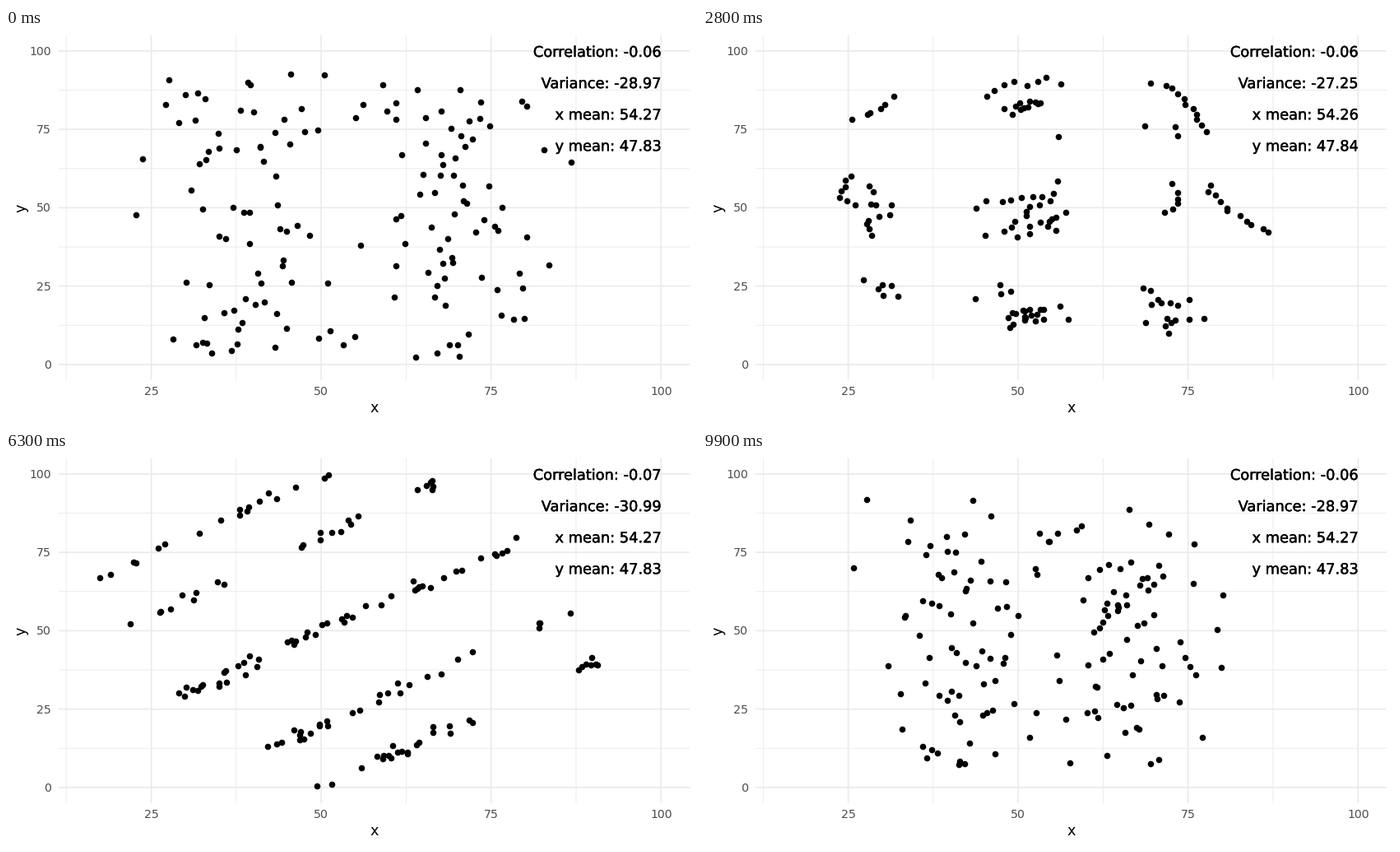
A matplotlib script for the animation above (10 s loop, 840x480 px).

```python
import numpy as np
import matplotlib.pyplot as plt
from matplotlib import patheffects
from matplotlib.animation import FuncAnimation

W, H, DPI = 840, 480, 100
PT = 72 / DPI
FRAMES, INTERVAL = 100, 100
MEAN, SD = np.array([54.27, 47.83]), np.array([16.77, 26.94])
rng = np.random.default_rng(8)


def to_pixels(points):
    return np.array([176.6, 408.9]) + (points - [25, 0]) * [8.262, -3.81]


def curve(*knots, spacing=3.45):
    """Evenly spaced points on a Catmull-Rom curve through the knots."""
    k = np.array(knots, float)
    k = np.vstack([2 * k[0] - k[1], k, 2 * k[-1] - k[-2]])
    t = np.linspace(0, 1, 30)[:, None]
    path = np.vstack([
        b + t * (c - a) / 2 + t**2 * (2 * a - 5 * b + 4 * c - d) / 2
        + t**3 * (3 * b - a - 3 * c + d) / 2
        for a, b, c, d in zip(k, k[1:], k[2:], k[3:])])
    run = np.append(0, np.cumsum(np.hypot(*np.diff(path, axis=0).T)))
    at = np.linspace(0, run[-1], max(2, round(run[-1] / spacing) + 1))
    return np.column_stack([np.interp(at, run, path[:, 0]), np.interp(at, run, path[:, 1])])


dino = np.vstack([
    curve((55.4, 97.2), (42.8, 91.4), (26.2, 71.4), (22.3, 57.2),
          (29.5, 51), (50, 55.3), (59.2, 57.9), (61.8, 69.1)),              # snout and jaw
    curve((58, 99.5), (70.8, 91), (77.7, 71.4), (86.4, 47.6), (98.2, 33.7)),  # back and tail
    curve((57.4, 55.3), (42.8, 32.6), (30, 36.8), (38.2, 49.1)),            # neck and arm
    curve((29.7, 36), (35.9, 25.3), (49.5, 31.4), (56.7, 42.2),
          (67.9, 47.9), (71.5, 62.5), (69.5, 69.5)),                        # claw and shoulder
    curve((46.9, 79.9), (53, 85.7), (56.2, 82.9), (47.9, 77.6), spacing=2.3),  # eye
    curve((29.7, 59.9), (31.3, 62.6)),                                      # nostril
    curve((56.7, 40.6), (64.4, 24.1)),                                      # thigh
    curve((74.4, 22.9), (56, 18.3), (44.9, 13.7), spacing=2.8),             # belly
    curve((48.7, 14.9), (56, 14.1), spacing=2.5),                           # feet
    curve((52, 12.6), (46.2, 6), spacing=2.8),
    curve((50.5, 9.5), (78.2, 10.6)),
    curve((68, 8.7), (68.2, 2.9)),
])
N = len(dino)


def fit(pts):
    """Give the cloud the shared mean and standard deviation."""
    return MEAN + (pts - pts.mean(0)) * SD / pts.std(0)


def two_clouds():
    side = np.where(np.arange(N) % 2, 1, -1)
    x = MEAN[0] + 15 * side + rng.normal(0, 6.5, N)
    return np.clip(fit(np.column_stack([x, rng.uniform(0, 95, N)])), 0, 98)


def outline(vertices):
    v = np.array(vertices, float)
    return np.stack([v, np.roll(v, -1, axis=0)], axis=1)


def circle(radius):
    a = np.linspace(0, 2 * np.pi, 90, endpoint=False)
    return outline(MEAN + radius * np.column_stack([np.cos(a), np.sin(a)]))


def rows(*ys):
    return np.array([[(0, y), (100, y)] for y in ys], float)


def columns(*xs):
    return rows(*xs)[..., ::-1]


def snap(pts, segs):
    """Move every point to the nearest place on any segment."""
    a, d = segs[:, 0], segs[:, 1] - segs[:, 0]
    t = ((pts[:, None] - a) * d).sum(2) / ((d * d).sum(1) + 1e-9)
    q = a + np.clip(t, 0, 1)[..., None] * d
    nearest = ((q - pts[:, None]) ** 2).sum(2).argmin(1)
    return q[np.arange(len(pts)), nearest]


def reshape_dino(segs, spread):
    pts = dino + rng.normal(0, 2.5, dino.shape)
    for _ in range(2):
        pts = fit(snap(pts, segs))
    return np.clip(snap(pts, segs) + rng.normal(0, spread, dino.shape), 0, 99.7)


bullseye = np.vstack([circle(18), circle(37)])
dots = np.array([[(x, y)] * 2 for x in np.linspace(25.8, 75.6, 3)
                 for y in np.linspace(18, 83, 3)])
slant_up = np.array([[(max(0, -c), max(0, c)), (100 - max(0, c), 100 - max(0, -c))]
                     for c in (-50, -30, 0, 30, 50)], float)
slant_down = slant_up * [1, -1] + [0, 100]
half_star = np.array([(60, 90), (68, 60), (92, 60), (72, 40), (80, 10), (60, 30)])
star = outline(np.vstack([half_star, half_star[-2:0:-1] * [-1, 1] + [120, 0]]))
cross = np.array([[(27, 0), (83, 100)], [(27, 100), (83, 0)]], float)

# Points, variance, x mean, y mean.
STATES = [
    (two_clouds(), -28.97, 54.27, 47.83),
    (reshape_dino(bullseye, 1), -30.98, 54.27, 47.83),
    (reshape_dino(circle(31.4), 0.8), -30.85, 54.27, 47.84),
    (dino, -29.11, 54.26, 47.83),
    (reshape_dino(dots, 0.8), -27.25, 54.26, 47.84),
    (reshape_dino(rows(*np.linspace(10.3, 90.4, 5)), 0.2), -27.87, 54.26, 47.83),
    (reshape_dino(rows(21.5, 76), 3.5), -30.94, 54.27, 47.84),
    (reshape_dino(slant_down, 1.1), -31.15, 54.27, 47.84),
    (reshape_dino(slant_up, 0.9), -30.99, 54.27, 47.83),
    (reshape_dino(star, 0.9), -28.43, 54.27, 47.84),
    (reshape_dino(columns(*np.linspace(30.5, 89.5, 4)), 0.15), -31.37, 54.27, 47.84),
    (reshape_dino(columns(38, 69.5), 4), -30.08, 54.27, 47.83),
    (reshape_dino(cross, 3), -29.62, 54.26, 47.84),
]
# Moves take six frames, the last three take five; each is preceded by a rest.
STEPS = [6] * 10 + [5] * 3
ARRIVE = np.cumsum([s + 2 for s in STEPS]) - 1

fig = plt.figure(figsize=(W / DPI, H / DPI), dpi=DPI, facecolor="white")
plt.rcParams["font.family"] = "DejaVu Sans"
ax = fig.add_axes([0, 0, 1, 1])
ax.set(xlim=(0, W), ylim=(H, 0))
ax.axis("off")


def grid(values, width):
    style = dict(color="#EBEBEB", lw=width * PT, solid_capstyle="butt", snap=False, zorder=1)
    for v in values:
        x, y = to_pixels(np.array([v, v]))
        ax.plot([63.8, 831.2], [y, y], **style)
        if v > 0:
            ax.plot([x, x], [8.8, 427.9], **style)


major = range(0, 101, 25)
grid(np.arange(12.5, 100, 25), 0.9)
grid(major, 1.75)
for v in major:
    x, y = to_pixels(np.array([v, v]))
    tick = dict(color="#4D4D4D", fontsize=14.08 * PT, va="baseline")
    ax.text(55, y + 5, v, ha="right", **tick)
    if v > 0:
        ax.text(x, 446, v, ha="center", **tick)
title = dict(ha="center", fontsize=17.6 * PT)
ax.text(447.5, 467, "x", va="baseline", **title)
ax.text(18, 218.5, "y", va="center", rotation=90, **title)

scatter, = ax.plot([], [], "o", color="black", ms=7.6 * PT, mew=0, zorder=3)
bolder = patheffects.withStroke(linewidth=0.3, foreground="black")
stats = [ax.text(796.5, 35 + 38.1 * i, "", ha="right", va="baseline", fontsize=17.8 * PT,
                 path_effects=[bolder], zorder=4) for i in range(4)]


def update(frame):
    i = int(np.searchsorted(ARRIVE, frame, side="right"))
    t = max(0, 1 - (ARRIVE[i] - frame) / STEPS[i])
    start, end = STATES[i], STATES[(i + 1) % len(STATES)]
    scatter.set_data(*to_pixels(start[0] + (end[0] - start[0]) * t).T)
    _, variance, x_mean, y_mean = end if t >= 0.5 else start
    values = {"Correlation": variance / SD.prod(), "Variance": variance,
              "x mean": x_mean, "y mean": y_mean}
    for text, (label, value) in zip(stats, values.items()):
        text.set_text(f"{label}: {value:.2f}")
    return [scatter, *stats]


anim = FuncAnimation(fig, update, frames=FRAMES, interval=INTERVAL, repeat=True)
plt.show()
```
